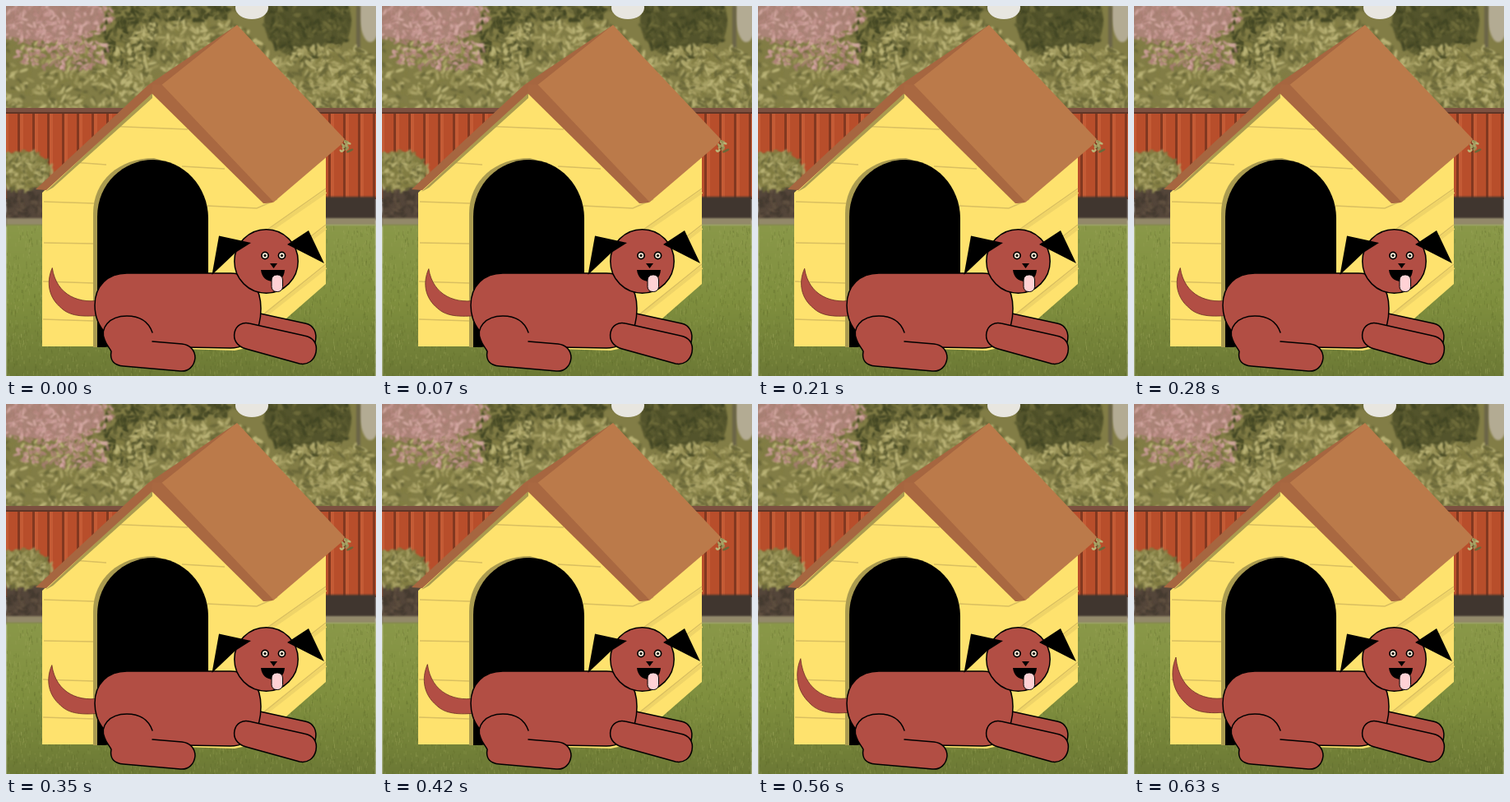
These frames come from a looping animation (450 by 450 pixels, 700 ms). An HTML page with a canvas:

```html
<!DOCTYPE html>
<html lang="en">
<head>
<meta charset="utf-8">
<title>Dog wagging its tail</title>
<style>
html, body { margin: 0; width: 100%; height: 100%; overflow: hidden; }
canvas, svg { position: absolute; left: 0; top: 0; width: 450px; height: 450px; }
.coat { fill: #b24e44; stroke: #000; stroke-width: 1.5; stroke-linejoin: round; stroke-linecap: round; }
.coat .fur { stroke: none; }
.coat .line { fill: none; }
.boards { fill: none; stroke: #d9bf60; stroke-width: 1.5; }
.shade { fill: none; stroke: #efd468; stroke-width: 4; }
</style>
</head>
<body>
<canvas id="garden" width="450" height="450"></canvas>
<svg viewBox="0 0 450 450">
  <!-- kennel walls -->
  <path fill="#fee26e" d="M44 227L178 104L322 238L389 181V338L302 414L278 419L119 414H44Z"/>
  <path class="shade" d="M302 286L389 226M302 337L389 270M302 387L389 318"/>
  <path class="boards" d="M134 146.500L221 150M88 190.500L122 193M214 195L266 198M46 238L107 240M245 243L305 246L330 235M46 288L107 289M45 335L107 337M45 381L107 383M302 283L389 222M302 334L389 266M302 384L389 314"/>
  <path fill="#aa9b50" d="M178 104L48 226L57 221L178 112Z"/>
  <!-- doorway -->
  <path fill="#aa9b50" d="M106 415V252C106 212 138 185 180 185L190 188L116 415Z"/>
  <path d="M111 415V256C111 216 143 187 179 187C216 187 246 220 246 258V400L120 415Z"/>
  <!-- roof -->
  <path fill="#a66640" d="M281 23L173 96L36 223L49 224L178 106L314 240L325 239L192 98Z"/>
  <path fill="#bb7a4a" d="M281 23L412 162L407 169L325 239L188 97Z"/>
  <path fill="#a96841" d="M178 95L190 96L325 238L313 240L177 106Z"/>

  <path id="tail" fill="#b24e44" stroke="#692c24" stroke-width=".8"/>
  <!-- body and legs -->
  <g class="coat">
    <path d="M309 374L364 386C374 388 379 397 376 409L350 405L300 388Z"/>
    <path d="M147 325H273C298 325 310 344 310 368C310 395 298 416 273 416L160 414C128 413 108 391 108 364C108 340 124 325 147 325Z"/>
    <path class="fur" d="M178 397C173 383 161 377 147 377C125 377 114 392 120 406C122 412 126 416 128 420C126 431 131 437 143 438L212 444C222 445 229 438 230 428C230 419 224 412 214 411L178 408Z"/>
    <path class="line" d="M178 397C173 383 161 377 147 377C125 377 114 392 120 406C122 412 126 416 128 420C126 431 131 437 143 438L212 444C222 445 229 438 230 428C230 419 224 412 214 411L178 408"/>
    <path d="M296 386L363 401C374 403 379 411 377 421C375 431 367 437 357 435L292 417C281 414 276 406 278 397C280 388 288 384 296 386Z"/>
    <circle cx="316.5" cy="310.5" r="38.700"/>
  </g>
  <!-- face -->
  <path d="M259 279.500L298 288L279 300L250.500 327ZM368 273L342 290L387 313Z"/>
  <g id="eye">
    <circle cx="315" cy="303.500" r="4.900"/>
    <circle cx="315" cy="303.500" r="3.200" fill="#fff0dc"/>
    <circle cx="315" cy="303.500" r="1.600"/>
  </g>
  <use href="#eye" x="20.500"/>
  <path d="M321 313H330L325.500 319ZM310 321H339C338 331 333 335 325 335C317 335 311 330 310 321Z"/>
  <rect x="323" y="327" width="13.500" height="20.500" rx="6" fill="#ffd2d5" stroke="#000" stroke-width="1"/>
</svg>
<script>
const ctx = document.getElementById('garden').getContext('2d');
let seed = 17;
const rnd = () => (seed = seed * 16807 % 2147483647) / 2147483647;

function box(x, y, w, h, color) {
  ctx.fillStyle = color;
  ctx.fillRect(x, y, w, h);
}

function blob(x, y, rx, ry, color, turn = 0) {
  ctx.fillStyle = color;
  ctx.beginPath();
  ctx.ellipse(x, y, rx, ry, turn, 0, 7);
  ctx.fill();
}

// Scatters leaf-shaped dabs inside an ellipse.
function leaves(count, x, y, rx, ry, size, colors) {
  for (let i = 0; i < count; i++) {
    const a = rnd() * 6.283, d = Math.sqrt(rnd());
    const color = colors[Math.floor(rnd() * colors.length)];
    blob(x + Math.cos(a) * d * rx, y + Math.sin(a) * d * ry,
      size * (.6 + rnd()), size * .45, color, rnd() * 3.14);
  }
}

function drawGarden() {
  const green = ['#989257', '#aaa367', '#827d43', '#6a6839', '#bbb477'];
  const dark = ['#4d4f28', '#5d5d31', '#6d6b3a', '#414523'];
  const pink = ['#c89995', '#d8aca7', '#b4857d', '#a57d70'];

  box(0, 0, 450, 130, '#827d46');
  ctx.filter = 'blur(1px)';
  leaves(420, 60, 85, 115, 48, 4, green);
  leaves(150, 150, 35, 35, 40, 4, dark);
  leaves(600, 225, 70, 95, 60, 4, green);
  leaves(130, 222, 5, 60, 14, 4, dark);
  blob(367, 18, 53, 46, '#53542c');
  leaves(220, 367, 18, 55, 48, 4, dark);
  blob(443, 10, 13, 34, '#b3ab93');
  box(426, 0, 5, 60, '#6b6547');
  leaves(600, 390, 90, 80, 42, 4, green);
  blob(45, 12, 75, 30, '#ab8477');
  leaves(420, 45, 12, 86, 34, 3, pink);
  leaves(160, 72, 58, 60, 20, 3, pink);
  ctx.filter = 'none';
  blob(299, 2, 20, 14, '#e8e6e0');

  box(0, 125, 450, 110, '#b84e2b');
  for (let x = -4; x < 450; x += 18) {
    box(x, 130, 3, 104, '#823820');
    box(x + 3, 130, 4, 104, '#c45b35');
  }
  box(0, 124, 450, 5, '#7c5040');
  box(0, 129, 450, 2, '#5f3526');
  leaves(14, 412, 172, 7, 9, 3, green);

  ctx.filter = 'blur(1px)';
  box(0, 208, 60, 60, '#54463a');
  box(380, 232, 70, 28, '#40362f');
  leaves(70, 20, 242, 30, 18, 3, ['#443a30', '#615141']);
  blob(20, 200, 34, 23, '#827d43');
  leaves(190, 20, 200, 36, 24, 3.5, green);
  box(0, 258, 450, 9, '#93896a');

  const lawn = ctx.createLinearGradient(0, 264, 0, 450);
  lawn.addColorStop(0, '#8a9849');
  lawn.addColorStop(.5, '#7f8f3e');
  lawn.addColorStop(1, '#6c7935');
  box(0, 266, 450, 190, lawn);
  ctx.filter = 'none';
  ctx.globalAlpha = .25;
  for (let i = 0; i < 3500; i++)
    box(rnd() * 450, 267 + rnd() * 183, 1, 2 + rnd() * 4, rnd() < .5 ? '#576628' : '#a8b163');
  ctx.globalAlpha = 1;
}

// Tail outline as point pairs, lowered and raised.
const low = [57,320, 49,338, 53,356, 68,368, 78,377, 92,379, 120,376, 120,357, 90,364, 62,352, 57,320];
const high = [51,308, 43,328, 47,348, 61,362, 72,375, 90,378, 118,374, 118,356, 88,364, 55,351, 51,308];
const lift = [.12, .03, 0, .06, .12, .2, .28, .55, .86, 1];
const tail = document.getElementById('tail');

function draw(now) {
  const k = lift[Math.floor(now % 700 / 70)];
  const p = low.map((v, i) => v + (high[i] - v) * k);
  tail.setAttribute('d', `M${p.slice(0, 2)}C${p.slice(2, 14)}L${p.slice(14, 16)}C${p.slice(16)}Z`);
}

const start = performance.now();
function tick() {
  draw(performance.now() - start);
  requestAnimationFrame(tick);
}
drawGarden();
tick();
</script>
</body>
</html>
```
